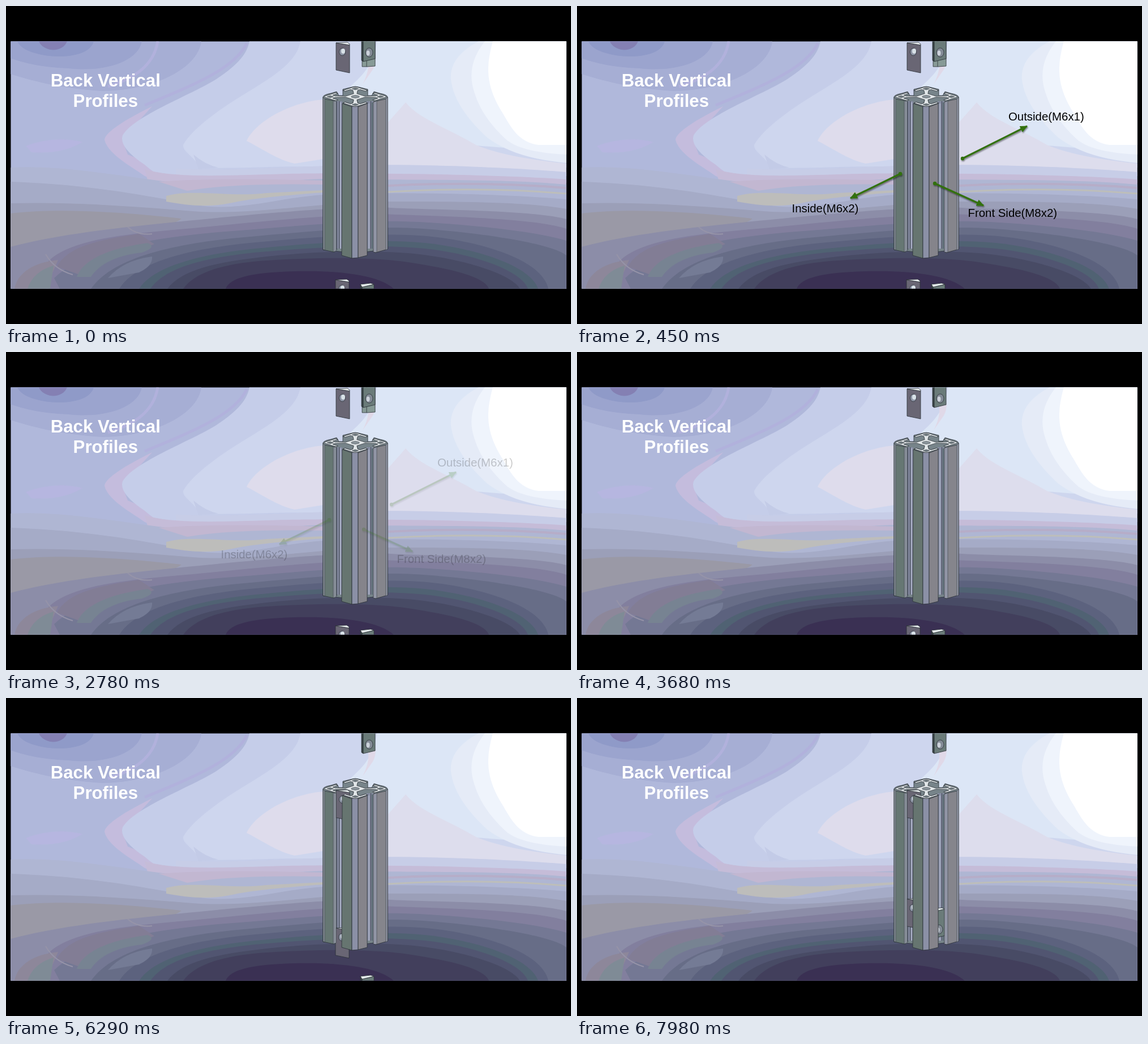
Write an HTML page that moves like this. It is 998 px wide and 561 px high and loops after 8000 ms.

```html
<!DOCTYPE html>
<html lang="en">
<head>
<meta charset="utf-8">
<title>Back Vertical Profiles</title>
<style>
html, body { margin: 0; width: 100%; height: 100%; overflow: hidden; background: #000; }
svg { display: block; }
text { font-family: "Liberation Sans", Arial, sans-serif; }
.title { font-size: 31.2px; font-weight: bold; fill: #fff; text-anchor: middle; }
#labels { font-size: 20.4px; }
.arrow { stroke: #32700f; stroke-width: 3.2; marker-start: url(#dot); marker-end: url(#head); }
.line { stroke: #2a3037; stroke-width: .8; stroke-linejoin: round; }
#top { vector-effect: non-scaling-stroke; }
</style>
</head>
<body>
<svg width="998" height="561" viewBox="0 0 998 561">
<defs>
  <marker id="dot" markerUnits="userSpaceOnUse" markerWidth="8" markerHeight="8" refX="4" refY="4"><circle cx="4" cy="4" r="3.2" fill="#32700f"/></marker>
  <marker id="head" markerUnits="userSpaceOnUse" markerWidth="13" markerHeight="12" refX="12" refY="6" orient="auto"><path d="M0 0L13 6 0 12z" fill="#32700f"/></marker>
  <filter id="shadow" x="-10%" y="-10%" width="120%" height="120%"><feDropShadow dx="1" dy="2" stdDeviation="1" flood-opacity=".45"/></filter>
  <clipPath id="front"><rect x="4.5" y="4.5" width="20" height="20"/></clipPath>

  <g id="nutL">
    <path class="line" fill="#696674" d="M583 65L607 69V118L583 113z"/>
    <path class="line" fill="#e9eef0" d="M583 65L603 64 607 67V69z"/>
    <ellipse class="line" cx="594" cy="81" rx="5.5" ry="6.5" fill="#8e95a6"/>
    <ellipse cx="595.5" cy="79.5" rx="3.5" ry="4.5" fill="#d9e2e8"/>
  </g>
  <g id="nutR">
    <path class="line" fill="#3b4648" d="M626 491L629 496V543L626 541z"/>
    <path class="line" fill="#6a7b79" d="M629 496L650 491V538L629 543z"/>
    <path class="line" fill="#e6eeee" d="M626 491L644 489 650 491 629 496z"/>
    <ellipse class="line" cx="639.5" cy="527" rx="6.5" ry="8" fill="#838b96"/>
    <ellipse cx="637.5" cy="528" rx="3" ry="4.5" fill="#ccd2da"/>
  </g>
  <!-- Slotted cross-section in millimetres, projected by the parent group -->
  <g id="face">
    <path id="top" class="line" fill="#e1e6e8" d="M-17-20H-4.5V-17H-11V-14L-5-7H5L11-14V-17H4.5V-20H17Q20-20 20-17V-4.5H17V-11H14L7-5V5L14 11H17V4.5H20V17Q20 20 17 20H4.5V17H11V14L5 7H-5L-11 14V17H-4.5V20H-17Q-20 20-20 17V4.5H-17V11H-14L-7 5V-5L-14-11H-17V-4.5H-20V-17Q-20-20-17-20z"/>
    <g fill="#6f7b80" stroke="#3a4148" stroke-width=".4">
      <circle r="3.6" fill="#8d979d"/>
      <path d="M13.5 13.5H17.5V17.5H13.5zM-13.5 13.5H-17.5V17.5H-13.5zM13.5-13.5H17.5V-17.5H13.5zM-13.5-13.5H-17.5V-17.5H-13.5z"/>
    </g>
  </g>
</defs>

<svg x="8.5" y="62.5" width="981" height="436" viewBox="8.5 62.5 981 436">
  <!-- Sky -->
  <path fill="#b0b8db" d="M8 62H990V499H8z"/>
  <path fill="#a6aed4" d="M8 62H345C340 110 260 150 170 150C90 145 40 130 8 120z"/>
  <path fill="#9ba4ce" d="M8 62H240C235 95 180 118 110 110C60 108 30 100 8 92z"/>
  <path fill="#8f9ac8" d="M20 62H155C150 85 110 92 75 88C45 84 25 75 20 62z"/>
  <path fill="#8480b3" d="M58 62H108C104 74 90 79 78 77C66 74 60 68 58 62z"/>
  <path fill="none" stroke="#b1b1dc" stroke-width="5" d="M268 62C262 100 235 125 180 142M425 66C405 110 330 140 245 175"/>
  <path fill="#b6b6e0" d="M35 247Q85 228 135 240Q100 262 45 258z"/>
  <path fill="#c4bcdd" d="M258 177C215 198 175 222 174 236C180 262 225 285 245 300L305 325 310 300 215 262 205 235z"/>
  <path fill="#c5cde9" d="M430 62C425 90 400 110 370 130C320 160 225 195 206 228C200 245 222 265 245 280C265 298 280 305 310 312H990V62z"/>
  <path fill="#ced6ee" d="M520 62C515 95 480 120 430 150C380 180 330 215 313 245C312 258 330 262 342 285C420 288 500 280 560 285H990V62z"/>
  <path fill="#c3cbe7" d="M331 262Q352 280 375 285L340 288z"/>
  <path fill="#dce6f6" d="M655 62C650 110 620 130 600 150V250C700 235 780 240 990 260V62z"/>
  <path fill="#dedcec" d="M560 165C500 170 440 205 425 238C450 250 480 272 510 278L560 270z"/>
  <path fill="#dddded" d="M675 205L706 170C730 200 780 215 830 245C870 262 930 272 990 278V300H675z"/>
  <path fill="#e0d9e8" d="M642 62Q660 90 648 112L630 138Q645 108 638 90z"/>
  <path fill="#e5ebf7" d="M835 62C805 78 783 100 786 130C790 165 815 200 850 232C890 262 940 272 990 277V62z"/>
  <path fill="#eff4fc" d="M846 62C828 85 818 110 824 140C832 175 850 205 885 237C910 255 950 260 990 262V62z"/>
  <path fill="#fff" d="M860 62C848 105 846 140 878 190C895 220 908 240 940 245H990V62z"/>
  <!-- Horizon -->
  <path fill="#c7cde7" d="M300 287C400 292 480 284 600 281S880 284 990 293V499H300z"/>
  <path fill="#c5bcd8" d="M245 288C300 305 400 298 500 296S850 296 990 306V499H300z"/>
  <path fill="#afb6d3" d="M8 285C100 280 200 300 300 312S500 302 600 305 880 304 990 315V499H8z"/>
  <path fill="#c2b7d1" d="M270 310Q370 302 560 308V315Q400 312 320 326z"/>
  <path fill="#a5abc7" d="M8 310C150 315 250 335 330 350S480 338 560 333 850 329 990 341V499H8z"/>
  <path fill="#bdbdbb" d="M283 335C330 322 400 338 460 330L560 325V329C520 332 440 338 400 347C360 356 320 352 283 345z"/>
  <path fill="none" stroke="#bdbeba" stroke-width="3" d="M675 328Q840 318 990 331"/>
  <path fill="none" stroke="#b6adc8" stroke-width="4" d="M675 317Q840 309 990 321"/>
  <!-- Ground -->
  <path fill="#9b9fb8" d="M8 348C120 345 230 354 330 362S560 345 680 345 920 345 990 358V499H8z"/>
  <path fill="#9a99a6" d="M8 366C100 355 220 365 310 375C280 400 150 420 8 425z"/>
  <path fill="#8c8da8" d="M8 425C100 400 230 388 330 378S600 352 680 356 930 360 990 376V499H8z"/>
  <path fill="#827f9e" d="M75 450C120 405 250 400 350 390S600 365 690 368 940 375 990 393V499H75z"/>
  <path fill="#747894" d="M85 480C150 420 300 405 400 397S620 378 700 380 930 395 990 414V499H95z"/>
  <path fill="#676d87" d="M150 499C190 440 310 418 420 408S640 388 720 392 960 415 990 440V499z"/>
  <path fill="#5c627e" d="M200 499C230 450 330 428 430 418S650 400 730 405 945 440 958 499z"/>
  <path fill="#506273" d="M235 499C260 460 340 438 440 428S660 410 740 418 925 455 940 499z"/>
  <path fill="#515571" d="M255 499C280 462 350 443 450 434S660 420 740 428 910 465 922 499z"/>
  <path fill="#484b65" d="M285 499C310 465 370 452 460 442S660 430 730 438 890 470 908 499z"/>
  <path fill="#423f5c" d="M313 499C330 475 370 455 460 449S650 443 710 452 845 475 853 499z"/>
  <path fill="#3a3053" d="M388 499C395 480 430 470 510 468S660 475 685 499z"/>
  <!-- Swirls at the lower left -->
  <path fill="#8d879a" d="M15 499C20 470 50 452 92 448L70 499z"/>
  <path fill="#7f8b96" d="M38 499Q48 468 84 458L78 499z"/>
  <path fill="#827d95" d="M90 460C110 422 170 412 235 402L262 420C215 438 150 440 130 474z"/>
  <path fill="#778392" d="M125 478C140 440 200 425 250 418Q268 425 240 435C195 440 165 455 150 478z"/>
  <path fill="#747b95" d="M180 480Q208 448 258 442Q260 458 235 470z"/>
  <path fill="none" stroke="#9694a8" stroke-width="2" d="M70 438Q86 465 118 474M215 390Q232 405 258 402"/>

  <path id="back" class="line" fill="#879a96" d="M629 55H652V106L638 107H629zM637 55V107"/>
  <use href="#nutR" x="2" y="-445"/>

  <!-- Rear of the extrusion, notched at the open slots -->
  <path class="line" fill="#77848a" d="M560 160Q562 156 574 154L584 151 588 158H595V147L611 143Q617 141 623 143L639 147V158H646L650 151 660 154Q672 156 674 160V429L617 436 560 430z"/>
  <path fill="#868ca2" d="M583 168H594V428H583zM637 168H649V428H637z"/>
  <path stroke="#3c424e" d="M584.5 168V430M588.5 168V428M644.5 168V428"/>
  <path stroke="#a4aac0" stroke-width="2" d="M591 170V428M641 172V428"/>
  <path stroke="#5b6d72" stroke-width="2" d="M647 170V428"/>
  <use href="#face" transform="matrix(1.425 .45 -1.425 .45 617 160)"/>

  <use id="upper" href="#nutL"/>
  <use id="lower" href="#nutL"/>
  <use id="right" href="#nutR"/>

  <!-- Front walls -->
  <path class="line" fill="#667773" d="M560 161L563 164 583 168V432L579 434 560 430z"/>
  <path fill="#858c96" d="M560.5 162L563 164V430L560.5 429zM578 168L583 168V432L578 433z"/>
  <path class="line" fill="#85858c" d="M674 161L671 164 649 169V434L653 435 674 429z"/>
  <path fill="#9296a6" d="M649.5 170L655 168V434L649.5 434zM671 164L673.5 162V429L671 430z"/>
  <path class="line" fill="#667570" d="M594 172L611 178V445L593 440z"/>
  <path class="line" fill="#8b90a6" d="M611 177H622V444L611 445z"/>
  <path class="line" fill="#85848b" d="M622 178L638 172V440L622 444z"/>
  <path stroke="#4a5158" stroke-width=".8" d="M563 164V430M578 168V433M655 168V434M671 164V430"/>
  <g transform="matrix(1.425 .45 -1.425 .45 617 160)"><use href="#face" clip-path="url(#front)"/></g>
</svg>

<text class="title" x="175.8" y="141.5">Back Vertical</text>
<text class="title" x="175.8" y="177.5">Profiles</text>

<g id="labels">
  <g filter="url(#shadow)">
    <path class="arrow" d="M571 296L483 339"/>
    <path class="arrow" d="M681 269L795 212"/>
    <path class="arrow" d="M632 313L718 352"/>
  </g>
  <text x="379.5" y="364">Inside(M6x2)</text>
  <text x="762" y="202">Outside(M6x1)</text>
  <text x="690.5" y="372">Front Side(M8x2)</text>
</g>
</svg>
<script>
const part = id => document.getElementById(id);
const clamp = (v, lo, hi) => Math.min(hi, Math.max(lo, v));

// Each part travels in ten even steps of 130 ms.
const steps = (t, start) => clamp(Math.floor((t - start) / 130) + 1, 0, 10);
const fade = (t, start) => clamp(Math.floor((t - start) / 30) / 15, 0, 1);
const move = (id, x, y) => part(id).setAttribute('transform', `translate(${x} ${y})`);

function draw() {
  const t = performance.now() % 8000;
  part('labels').setAttribute('opacity', fade(t, 0) - fade(t, 2420));
  move('back', 0, 17 * steps(t, 3030));
  move('upper', 0, 9.8 * steps(t, 4340));
  move('lower', -1, 418 - 12.85 * steps(t, 5640));
  move('right', 0, -13.2 * steps(t, 6940));
  requestAnimationFrame(draw);
}
draw();
</script>
</body>
</html>
```
